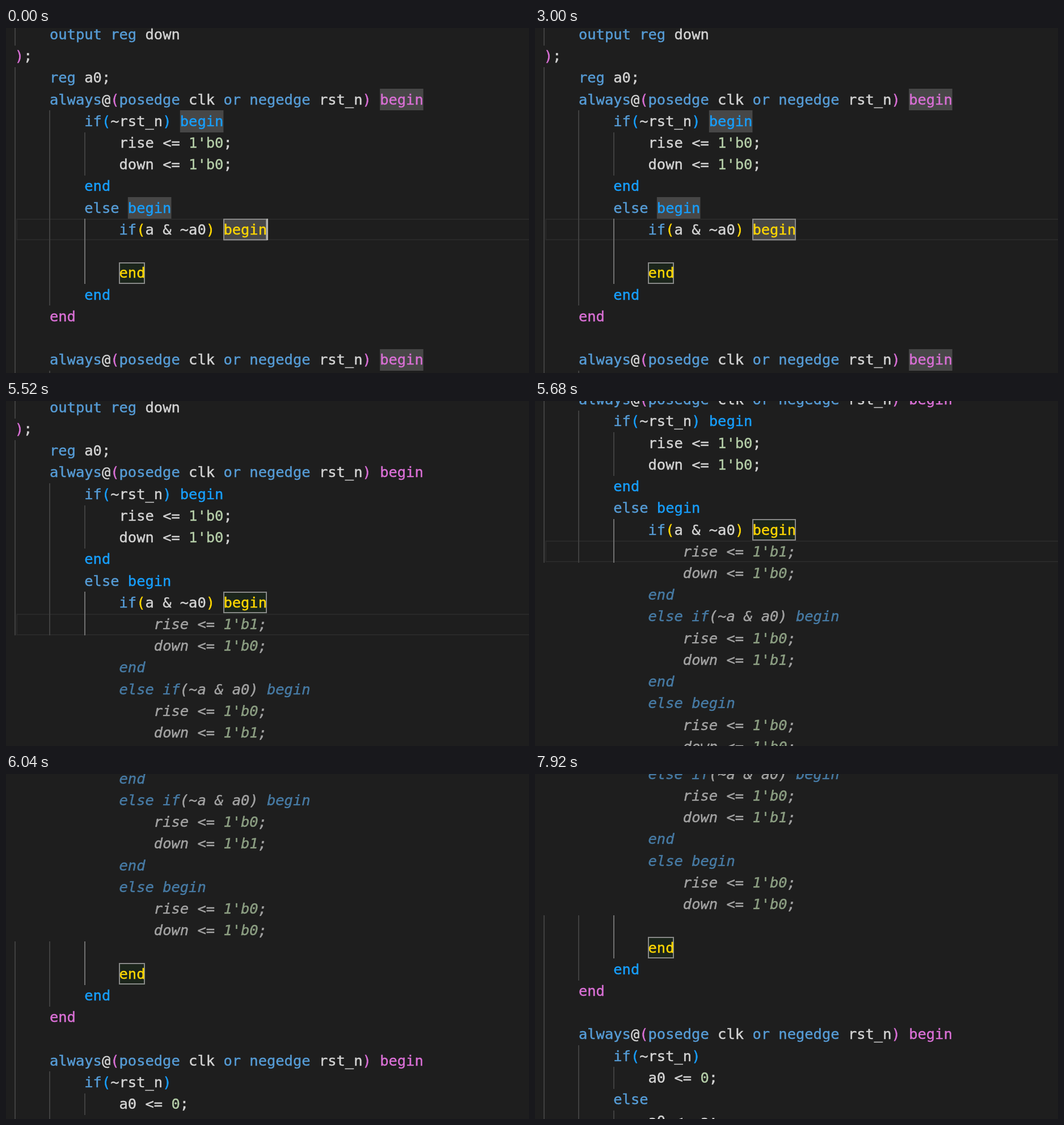
Recreate the animation shown at these times as an HTML page with a canvas. Size 922 px wide and 608 px high, loop 8 s.

```html
<!DOCTYPE html>
<html lang="en">
<head>
<meta charset="utf-8">
<title>Code editor</title>
<style>
  html, body { margin: 0; width: 922px; height: 608px; overflow: hidden; background: #1e1e1e; }
  canvas { display: block; }
</style>
</head>
<body>
<canvas id="stage" width="922" height="608"></canvas>
<script>
const ctx = document.getElementById('stage').getContext('2d');
const LOOP = 8000, CHAR = 15.32, LINE = 38.22, LEFT = 15.7, TOP = -7.5;
const FONT = '25.44px "DejaVu Sans Mono", monospace';
const BRACKETS = ['#ffd700', '#da70d6', '#179fff'];
const KEYWORDS = /^(output|reg|always|posedge|negedge|or|if|else|begin|end)$/;
const ENTER = 3240, SUGGEST = 3640, SCROLL_START = 5520, SCROLL_TIME = 680, SCROLL_BY = 508;
const CARET_ON = [[0, 480], [840, 2000], [2480, 2960], [ENTER, 4440], [4940, 5440], [5940, LOOP]];

const head = `    output reg down
);
    reg a0;
    always@(posedge clk or negedge rst_n) begin
        if(~rst_n) begin
            rise <= 1'b0;
            down <= 1'b0;
        end
        else begin
            if(a & ~a0) begin`.split('\n');
const tail = `            end
        end
    end

    always@(posedge clk or negedge rst_n) begin
        if(~rst_n)
            a0 <= 0;
        else
            a0 <= a;`.split('\n');
const suggestion = `                rise <= 1'b1;
                down <= 1'b0;
            end
            else if(~a & a0) begin
                rise <= 1'b0;
                down <= 1'b1;
            end
            else begin
                rise <= 1'b0;
                down <= 1'b0;`.split('\n');

// Splits a document into coloured tokens, colouring pairs by nesting depth.
function layout(middle, ghostCount) {
  let depth = 2;
  const lines = [...head, ...middle, ...tail];
  const boxedEnd = lines.length - tail.length;
  const rows = lines.map((text, i) => {
    const ghost = i >= head.length && i < head.length + ghostCount;
    const tokens = [...text.matchAll(/[a-z_]\w*|\d+('b\d)?|\S/g)].map(match => {
      const word = match[0];
      let color = '#d4d4d4';
      if (KEYWORDS.test(word)) color = '#569cd6';
      else if (/^\d/.test(word)) color = '#b5cea8';
      if (!ghost && /^(\(|begin)$/.test(word)) color = BRACKETS[depth++ % 3];
      if (!ghost && /^(\)|end)$/.test(word)) color = BRACKETS[--depth % 3];
      return { word, color, col: match.index };
    });
    let indent = text ? text.search(/\S|$/) : i < boxedEnd ? 12 : 4;
    if (ghost) indent = i === head.length ? 12 : 0;
    return { tokens, ghost, indent };
  });
  return { rows, boxedEnd };
}

const typed = layout([''], 0);
const entered = layout(['', ''], 0);
const suggested = layout([...suggestion, ''], suggestion.length);

const colX = col => LEFT + col * CHAR;

function rect(color, x, y, w, h) {
  ctx.fillStyle = color;
  ctx.fillRect(x, y, w, h);
}

function frame(color, x, y, w, h) {
  ctx.strokeStyle = color;
  ctx.lineWidth = 2;
  ctx.strokeRect(x + 1, y + 1, w - 2, h - 2);
}

// The thin outline gives the slightly heavier strokes of smoothed screen text.
function write(word, color, x, y) {
  ctx.fillStyle = ctx.strokeStyle = color;
  ctx.lineWidth = 0.45;
  ctx.fillText(word, x, y);
  ctx.strokeText(word, x, y);
}

function scrollAt(t) {
  const p = Math.min(1, Math.max(0, (t - SCROLL_START) / SCROLL_TIME)) ** 0.773;
  return SCROLL_BY * p * p * (3 - 2 * p);
}

function drawPointer(t) {
  if (t < 1280 || t > 2080) return;
  const k = t < 1560 ? (1560 - t) / 280 : Math.max(0, (t - 1640) / 440);
  ctx.save();
  ctx.translate(846 + 80 * k * k, 301 + 22 * k * k);
  const shape = new Path2D('M0 0V33L7.5 26L12.5 37.5L17.5 35.3L12.5 23.5H22Z');
  ctx.fillStyle = '#000';
  ctx.strokeStyle = '#fff';
  ctx.lineWidth = 2.4;
  ctx.fill(shape);
  ctx.stroke(shape);
  ctx.restore();
}

function draw(t) {
  const { rows, boxedEnd } = t < ENTER ? typed : t < SUGGEST ? entered : suggested;
  const top = TOP - scrollAt(t);
  const rowY = row => Math.round(top + row * LINE);
  const current = t < ENTER ? 9 : 10;
  rect('#1e1e1e', 0, 0, 922, 608);
  frame('#292929', 18, rowY(current), 920, 38);

  rows.forEach(({ tokens, ghost, indent }, i) => {
    const y = rowY(i), height = rowY(i + 1) - y;
    if (y > 608 || y < -LINE) return;
    for (let col = 0; col < indent; col += 4) {
      const active = col === 8 && i >= 9 && i <= boxedEnd;
      rect(active ? '#707070' : '#404040', Math.round(colX(col) - 0.6), y, 2, height);
    }
    ctx.font = (ghost ? 'italic ' : '') + FONT;
    for (const { word, color, col } of tokens) {
      const x = colX(col), width = word.length * CHAR;
      const boxed = (i === 9 && word === 'begin') || i === boxedEnd;
      const marked = t < ENTER && word === 'begin';
      if (marked) rect('#474747', x, y, width, height);
      else if (boxed) rect('#1b251b', x, y, width, height);
      if (boxed) frame('#888', Math.round(x - 0.8), y, Math.round(width), 38);
      ctx.globalAlpha = ghost ? 0.7 : 1;
      write(word, color, x, top + i * LINE + 27.4);
      ctx.globalAlpha = 1;
    }
  });

  if (CARET_ON.some(([on, off]) => t >= on && t < off)) {
    rect('#aeafad', Math.round(colX(current === 9 ? 29 : 16) - 0.8), rowY(current), 3, 38);
  }
  drawPointer(t);
}

function tick() {
  draw(performance.now() % LOOP);
  requestAnimationFrame(tick);
}
tick();
</script>
</body>
</html>
```
